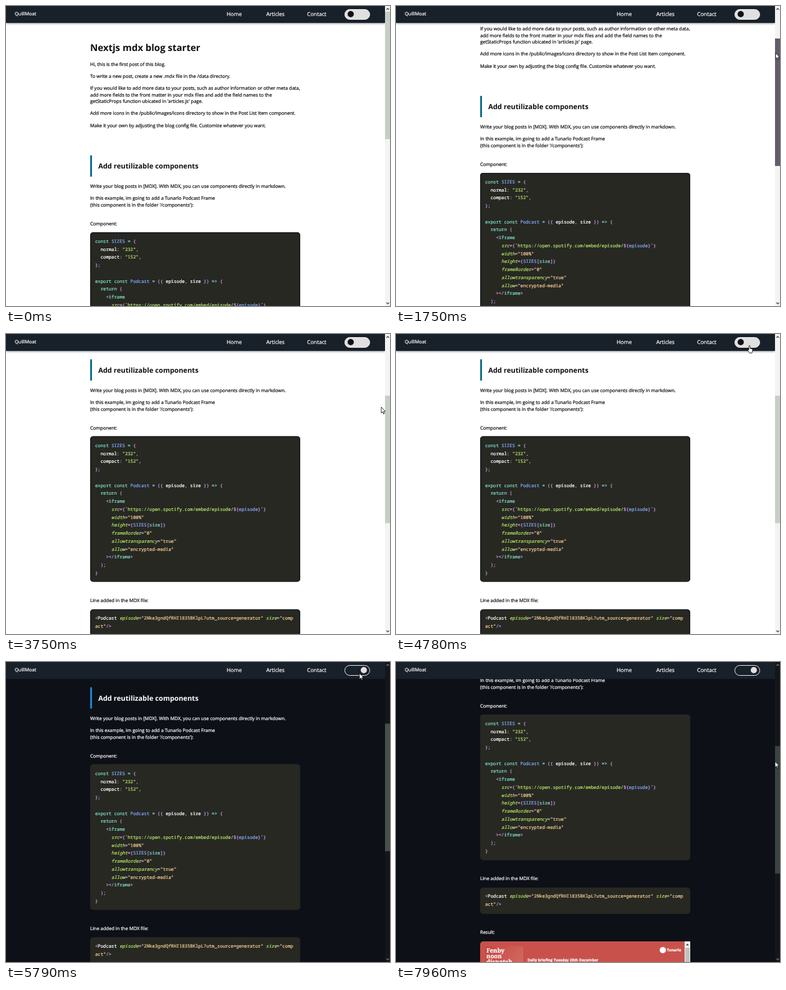
Animation of 616x480 px, one loop 7.99 s. Source, as an HTML page:

```html
<!DOCTYPE html>
<html lang="en">
<head>
<meta charset="utf-8">
<title>Blog starter</title>
<style>
html, body { margin: 0; width: 100%; height: 100%; overflow: hidden; }
#stage {
  position: relative; width: 616px; height: 480px; overflow: hidden;
  background: var(--page); color: var(--ink);
  font: 7.53px "Open Sans", "Noto Sans", sans-serif;
  text-rendering: geometricPrecision; -webkit-text-stroke: .22px;
}
#stage div, #stage pre, #stage svg { position: absolute; }
#page { left: 0; top: 0; width: 608px; height: 900px; }
/* zero line height: top is the vertical centre of the text */
.line { line-height: 0; white-space: pre; }
.h1 { font-size: 15.02px; font-weight: 700; -webkit-text-stroke: 0; }
.h2 { font-size: 11.22px; font-weight: 700; -webkit-text-stroke: 0; }
.bar { left: 135px; top: 239px; width: 3px; height: 34px; background: var(--accent); }

pre {
  left: 135px; width: 337px; box-sizing: border-box; margin: 0; padding: 8.5px 8px 7.8px;
  border-radius: 5px; background: #272822; box-shadow: inset 0 0 0 1.5px var(--edge);
  font: 7.25px/12.75px "Noto Sans Mono", "DejaVu Sans Mono", monospace; color: #cf98ee;
}
pre * { font-weight: 400; font-style: normal; text-decoration: none; }
pre b { color: #7fdbca; }
pre u { color: #82aaff; }
pre s { color: #b4e36c; }
pre a { color: #f0cb97; }
pre em { color: #fff; }
pre i { color: #b0df68; font-style: italic; }

#player {
  left: 135px; top: 724.5px; width: 337px; height: 90px; overflow: hidden;
  border-radius: 5px 0 0 0; background: #c8524b; color: #fff;
}
#art {
  left: 8px; top: 8.5px; width: 61px; height: 61px; border-radius: 3px;
  background: linear-gradient(120deg, #c4453f, #d5736a);
}
#art .line { left: 2px; font: 700 9.6px/0 "Noto Serif", serif; }
.small { font-size: 6.03px; font-weight: 700; }
#dot { left: 288px; top: 9px; width: 10px; height: 10px; border-radius: 50%; background: #fff; }
#playerBar { left: 328px; top: 0; width: 9px; height: 90px; background: #f1f1f1; }
#playerBar div { left: 1px; top: 10px; width: 7px; height: 80px; background: #c1c1c1; }

#header {
  left: 0; top: 0; width: 607.5px; height: 27px; background: #18202a; color: #fff;
  box-shadow: 0 1px 3px var(--shade);
}
.nav { font-size: 8.6px; }
#toggle {
  left: 543px; top: 4.5px; width: 41px; height: 17.5px; box-sizing: border-box;
  border: 1.3px solid #eee8ec; border-radius: 9px; background: var(--pill);
}
#knob { left: 4px; top: 2.6px; width: 10px; height: 10px; border-radius: 50%; background: var(--knob); }

#scrollbar { left: 607.5px; top: 0; width: 8.5px; height: 480px; background: var(--track); }
#thumb { left: 0; top: 9px; width: 8.5px; height: 204px; background: var(--thumb); }
#scrollbar path { fill: none; stroke: var(--arrow); stroke-width: 1.2; }
#cursor { left: 0; top: 0; overflow: visible; }
#cursor path { fill: #fff; stroke: #000; stroke-width: .8; stroke-linejoin: round; }
</style>
</head>
<body>
<div id="stage">
  <div id="page">
    <div class="bar"></div>
    <pre style="top:362.3px"><b>const</b> <u>SIZES</u> <b>=</b> {
  <em>normal</em><b>:</b> <s>"232"</s>,
  <em>compact</em><b>:</b> <s>"152"</s>,
};

<b>export const</b> <u>Podcast</u> <b>=</b> ({ <em>episode</em>, <em>size</em> }) <b>=&gt;</b> {
  <b>return</b> (
    &lt;<b>iframe</b>
      <i>src</i>={<s>`https://open.spotify.com/embed/episode/</s>${<u>episode</u>}<s>`</s>}
      <i>width</i>=<a>"100%"</a>
      <i>height</i>={<u>SIZES</u>[<b>size</b>]}
      <i>frameBorder</i>=<a>"0"</a>
      <i>allowtransparency</i>=<a>"true"</a>
      <i>allow</i>=<a>"encrypted-media"</a>
    &gt;&lt;/<b>iframe</b>&gt;
  );
}</pre>
    <pre style="top:638.8px">&lt;<em>Podcast</em> <i>episode</i>=<a>"2Nke3gndQfRHI1835BKlpL?utm_source=generator"</a> <i>size</i>=<a>"comp
act"</a>/&gt;</pre>
    <div id="player">
      <div id="art"></div>
      <div id="dot"></div>
      <div id="playerBar"><div></div>
        <svg width="9" height="10"><path d="M2 6.5 4.5 3.5 7 6.5Z" fill="#444"/></svg>
      </div>
    </div>
  </div>
  <div id="header">
    <div id="toggle"><div id="knob"></div></div>
  </div>
  <div id="scrollbar">
    <div id="thumb"></div>
    <svg width="9" height="480"><path d="M2.3 6 4.4 3.8 6.5 6M2.3 474.5 4.4 476.7 6.5 474.5"/></svg>
  </div>
  <svg id="cursor" width="10" height="14">
    <path id="arrow" d="M0 0V9.6L2.2 7.6 3.7 11 5.2 10.3 3.7 7.1H6.6Z"/>
    <path id="hand" d="M0 .4Q1 .4 1 1.5V5L4 5.7Q5.3 6.1 5.1 7.6L4.6 10 4 12.4H.2L-2.6 8.2Q-3.1 6.8-1.9 6.9L-1 7.7V1.5Q-1 .4 0 .4Z"/>
  </svg>
</div>
<script>
const LOOP = 7990;
const $ = id => document.getElementById(id);

function addLine(parent, x, y, text, kind = "") {
  const el = document.createElement("div");
  el.className = "line " + kind;
  el.style.left = x + "px";
  el.style.top = y + "px";
  el.textContent = text;
  $(parent).append(el);
}

addLine("page", 135, 66.5, "Nextjs mdx blog starter", "h1");
addLine("page", 148, 257, "Add reutilizable components", "h2");
[
  [93.5, "Hi, this is the first post of this blog."],
  [113, "To write a new post, create a new .mdx file in the /data directory."],
  [132, "If you would like to add more data to your posts, such as author information or other meta data,"],
  [142.7, "add more fields to the front matter in your mdx files and add the field names to the"],
  [153.3, "getStaticProps function ubicated in 'articles.js' page."],
  [172.3, "Add more icons in the /public/images/icons directory to show in the Post List Item component."],
  [191.5, "Make it your own by adjusting the blog config file. Customize whatever you want."],
  [289, "Write your blog posts in [MDX]. With MDX, you can use components directly in markdown."],
  [308.4, "In this example, im going to add a Tunarlo Podcast Frame"],
  [319.1, "(this component is in the folder '/components'):"],
  [348.8, "Component:"],
  [625.3, "Line added in the MDX file:"],
  [711, "Result:"]
].forEach(([y, text]) => addLine("page", 135, y, text));
["Fenby", "noon", "dispatch"].forEach((word, i) => addLine("art", 2, 7 + i * 9, word));
addLine("player", 76, 30, "Daily briefing Tuesday 28th December", "small");
addLine("player", 299.5, 14, "Tunarlo", "small");
addLine("header", 14, 13, "QuillMoat");
addLine("header", 354, 13, "Home", "nav");
addLine("header", 417.5, 13, "Articles", "nav");
addLine("header", 483, 13, "Contact", "nav");

// Keyframes: [time, value, ...], linear in between
const scrollKeys = [[960, 0], [1100, 12], [1750, 95], [2300, 161], [2590, 186],
  [2850, 195], [3350, 198.5], [7250, 198.5], [7420, 207], [7600, 229], [7960, 278]];
const cursorKeys = [[190, 136, 482], [500, 400, 240], [700, 570, 70], [900, 609, 32], [960, 609, 32],
  [1750, 609, 75], [2590, 603, 112], [3350, 602, 117], [3750, 602, 117],
  [3950, 596, 95], [4350, 570, 32], [4700, 567, 18], [6020, 567, 18],
  [6200, 574, 38], [6550, 602, 104], [6800, 610, 119], [7250, 610, 119],
  [7420, 610, 123], [7600, 609, 134], [7960, 608, 159]];

const clamp = v => Math.min(1, Math.max(0, v));

function sample(keys, time) {
  const next = keys.findIndex(key => key[0] > time);
  if (next === 0) return keys[0].slice(1);
  if (next < 0) return keys[keys.length - 1].slice(1);
  const a = keys[next - 1], b = keys[next];
  const k = (time - a[0]) / (b[0] - a[0]);
  return a.slice(1).map((v, i) => v + (b[i + 1] - v) * k);
}

// CSS "ease": cubic-bezier(.25, .1, .25, 1)
function ease(x) {
  const bezier = (p, q, s) => 3 * p * s * (1 - s) ** 2 + 3 * q * s * s * (1 - s) + s ** 3;
  let low = 0, high = 1;
  for (let i = 0; i < 20; i++) {
    const mid = (low + high) / 2;
    if (bezier(.25, .25, mid) < x) low = mid; else high = mid;
  }
  return bezier(.1, 1, low);
}

const mix = (a, b, k) => `rgb(${a.map((v, i) => Math.round(v + (b[i] - v) * k))})`;

function render(time) {
  const dark = ease(clamp((time - 5130) / 500));
  const flip = ease(clamp((time - 5130) / 200));
  const night = dark > .6;
  const dragging = (time >= 940 && time < 3750) || time >= 6830;
  const [scroll] = sample(scrollKeys, time);
  const [x, y] = sample(cursorKeys, time);

  const colors = {
    page: mix([255, 255, 255], [14, 16, 23], dark),
    ink: mix([17, 17, 20], [255, 255, 255], dark),
    accent: mix([19, 111, 140], [28, 134, 204], dark),
    edge: mix([20, 26, 32], [39, 40, 34], dark),
    shade: `rgba(0,0,0,${.5 * (1 - dark)})`,
    pill: mix([224, 224, 224], [24, 32, 42], flip),
    knob: mix([16, 18, 24], [228, 224, 226], flip),
    track: night ? "#14161b" : "#f2f3f2",
    arrow: night ? "#777" : "#444",
    thumb: night ? (dragging ? "#39433f" : "#474f4a") : (dragging ? "#645c6b" : "#c6cec6")
  };
  for (const name in colors) $("stage").style.setProperty("--" + name, colors[name]);

  $("page").style.transform = `translateY(${-scroll}px)`;
  $("thumb").style.transform = `translateY(${scroll * .4516}px)`;
  $("knob").style.transform = `translateX(${21 * flip}px)`;

  const pointing = time >= 4570 && time < 5790;
  $("cursor").style.display = time < 190 ? "none" : "block";
  $("cursor").style.transform = `translate(${x}px, ${y}px)`;
  $("hand").style.display = pointing ? "inline" : "none";
  $("arrow").style.display = pointing ? "none" : "inline";
}

const start = performance.now();
function tick() {
  render((performance.now() - start) % LOOP);
  requestAnimationFrame(tick);
}
tick();
</script>
</body>
</html>
```
